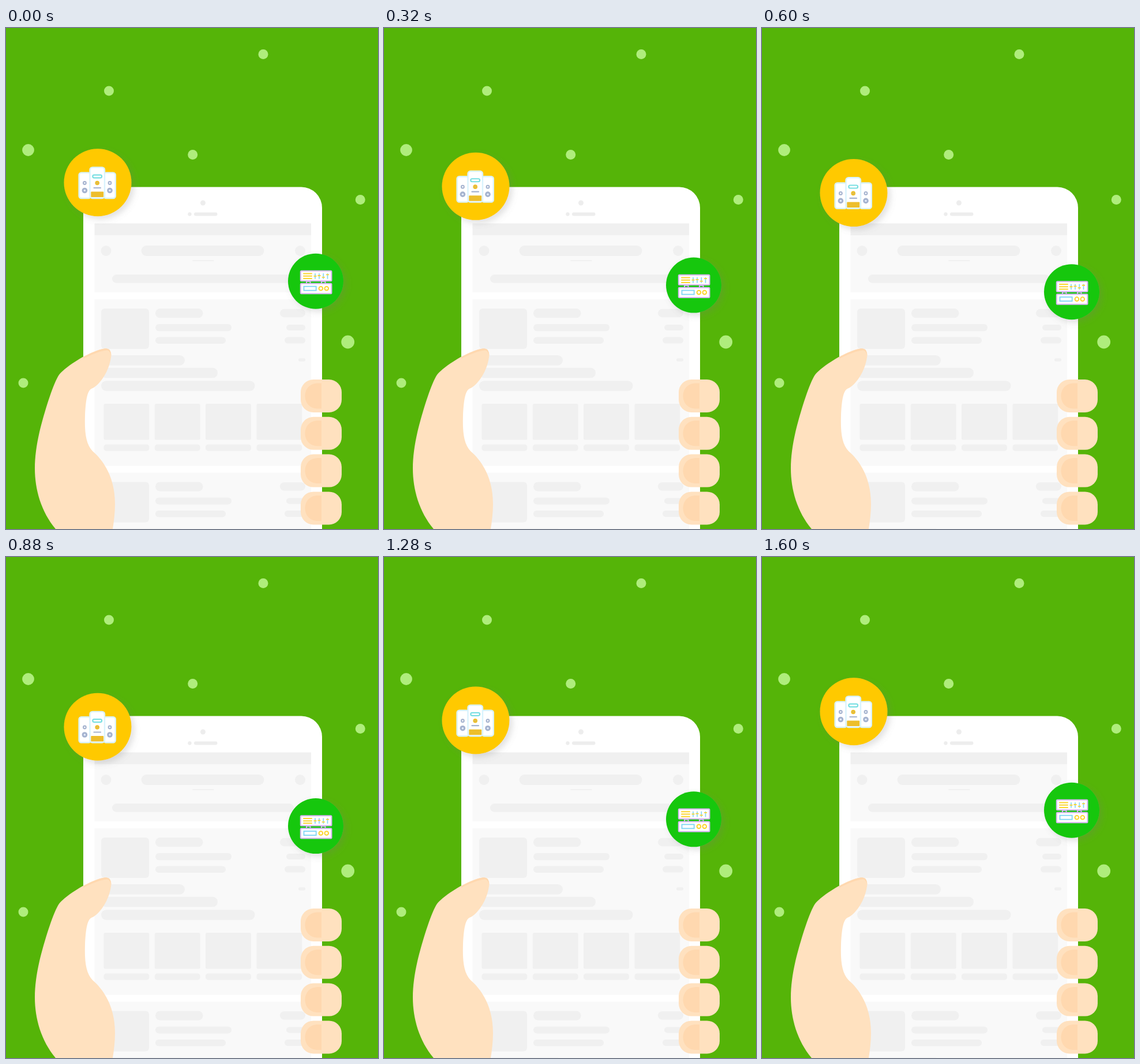
An HTML page that plays this animation: 645x868 px, repeating every 2200 ms.

```html
<!DOCTYPE html>
<html lang="en">
<head>
<meta charset="utf-8">
<title>Tablet in hand</title>
<style>
html, body { margin: 0; width: 100%; height: 100%; overflow: hidden; background: #55b408; }
svg { display: block; width: 645px; height: 868px; }
.grey { fill: #f0f0f0; }
.skin { fill: #ffe1bf; }
.shade { fill: #ffd8af; }
.panel { fill: #f9f9f9; }
.speaker rect.box { fill: #fff; stroke: #d9f3fd; stroke-width: 2.4; }
.speaker .cone { fill: #a5b3cf; }
.line { fill: none; stroke-linecap: round; }
</style>
</head>
<body>
<svg viewBox="0 0 645 868">
  <defs>
    <filter id="shadow" x="-30%" y="-30%" width="170%" height="170%">
      <feDropShadow dx="5" dy="5" stdDeviation="5.5" flood-color="#777" flood-opacity=".22"/>
    </filter>
  </defs>
  <rect width="645" height="868" fill="#55b408"/>
  <g id="dots" fill="#afed7c"></g>

  <rect x="134" y="275.5" width="414" height="640" rx="36" fill="#fff"/>
  <g fill="#ededed">
    <circle cx="341.5" cy="303" r="4.5"/>
    <circle cx="318.5" cy="322.5" r="3.2"/>
    <rect x="326" y="319.5" width="40.5" height="6" rx="3"/>
  </g>
  <g id="screen"></g>

  <path class="skin" d="M86 868C61 838 50 800 50 763C50 743 53 722 58 700
    C67 664 80 622 90 604C92 600 95 597 98 594.500C119 576 146 562 161 558
    C169 555 175 554.500 179 557C182 560 183 566 182 571C179 590 170 605 163 613
    C158 619 153 623 148 625C140 629 138 650 137 672C136 702 139 721 150 733
    C172 752 189 782 189 825C189 840 187 855 185 868Z"/>
  <path class="shade" d="M134 570.500C145 564 160 557 170 555.500C178 554.500 182 557 182.500 568
    C180 559 177 557.500 171 559C160 561 148 566 134 573Z"/>
  <g id="fingers"></g>

  <g id="orange">
    <circle cx="159" cy="267.700" r="58.500" fill="#ffc900" filter="url(#shadow)"/>
    <g class="speaker">
      <g id="sides"></g>
      <rect class="box" x="145.500" y="241.400" width="25.500" height="53.600" rx="4.500"/>
      <rect x="150.300" y="254.600" width="15.800" height="5" rx="2.500" fill="#fff" stroke="#7adfe2" stroke-width="2.200"/>
      <circle cx="158.200" cy="268.500" r="3.800" fill="#f0c024"/>
      <path class="line" d="M156.700 269.800a1.700 1.700 0 1 1 3 0" stroke="#c9b88c" stroke-width="1"/>
      <path class="line" d="M152.500 277H164" stroke="#a5b3cf" stroke-width="2.200"/>
      <rect x="147.300" y="283.500" width="21.900" height="9.600" rx="1" fill="#edbe2c"/>
    </g>
  </g>

  <g id="green">
    <circle cx="537" cy="438.700" r="48" fill="#14c70e" filter="url(#shadow)"/>
    <g stroke="#d6b4f2" stroke-width="2">
      <path class="line" d="M521 441.500V439H527.500V441.500M547 441.500V439H553.500V441.500"/>
      <rect x="510.800" y="420.800" width="53.700" height="17.400" rx="1.500" fill="#fff"/>
      <rect x="510.800" y="442.800" width="53.700" height="17.400" rx="1.500" fill="#fff"/>
    </g>
    <path class="line" d="M516 425.600H530M516 429.800H530M516 434H530" stroke="#fcd52e" stroke-width="2"/>
    <g id="sliders"></g>
    <rect x="516.500" y="447.700" width="21.200" height="7" fill="none" stroke="#83d6f5" stroke-width="1.900"/>
    <g fill="none" stroke="#fcd52e" stroke-width="2">
      <circle cx="545.900" cy="451.200" r="3.300"/>
      <circle cx="555.800" cy="451.200" r="3.300"/>
    </g>
  </g>
</svg>
<script>
const $ = id => document.getElementById(id);

function add(parent, tag, attrs) {
  const el = document.createElementNS("http://www.w3.org/2000/svg", tag);
  for (const key in attrs) el.setAttribute(key, attrs[key]);
  return parent.appendChild(el);
}
const circle = (parent, cx, cy, r, cls = "") => add(parent, "circle", { cx, cy, r, class: cls });
const box = (parent, x1, y1, x2, y2, rx = 0, cls = "grey") =>
  add(parent, "rect", { x: x1, y: y1, width: x2 - x1, height: y2 - y1, rx, class: cls });
const pill = (parent, x1, y1, x2, y2) => box(parent, x1, y1, x2, y2, (y2 - y1) / 2);

[[446, 45.5, 8.5], [178.5, 109, 8.5], [38.5, 211.5, 10.4], [323.7, 219.5, 8.5],
 [614.3, 297.5, 8.5], [592.7, 544, 11.4], [30, 615, 8.5]]
  .forEach(dot => circle($("dots"), ...dot));

const screen = $("screen");
box(screen, 153.5, 338.5, 529, 359);
box(screen, 153.5, 359, 529, 458, 0, "panel");
circle(screen, 173.5, 386, 9, "grey");
circle(screen, 510, 386, 9, "grey");
pill(screen, 234.5, 377, 447.5, 395);
box(screen, 323, 402.2, 360.5, 404, 1);
pill(screen, 184, 427.3, 499, 441.7);

function card(y) {
  const g = add(screen, "g", { transform: `translate(0 ${y})` });
  box(g, 153.5, 0, 529, 288.5, 0, "panel");
  box(g, 165, 16, 248, 86, 6);
  pill(g, 259, 16, 341.5, 32.3);
  pill(g, 259, 43, 391, 55.2);
  pill(g, 259, 65.5, 381, 77);
  pill(g, 475, 16.8, 519, 31.2);
  pill(g, 486, 44, 519, 54);
  pill(g, 483, 65.5, 519, 76.6);
  pill(g, 165, 97, 310, 114.5);
  pill(g, 165, 118.7, 367, 136.2);
  pill(g, 165, 141.2, 431.5, 158.8);
  pill(g, 507, 102.3, 519, 107.7);
  for (let i = 0; i < 4; i++) {
    const x = 169.5 + i * 88.3;
    box(g, x, 181, x + 78.8, 243.5, 2.5);
    box(g, x, 251.5, x + 78.8, 262.8, 4.5);
  }
}
card(470);
card(770.4);

for (let i = 0; i < 4; i++) {
  const g = add($("fingers"), "g", { transform: `translate(0 ${609 + i * 64.8})` });
  box(g, 511, 0, 582, 57, 22, "skin");
  add(g, "path", { class: "shade", d: "M547 6.500H541C526 6.500 518.500 17 518.500 28.500S526 50.500 541 50.500H547Z" });
}

for (const [x, cx] of [[126.6, 136.4], [169.6, 180]]) {
  const g = $("sides");
  box(g, x, 250.6, x + 20.2, 295, 4, "box");
  circle(g, cx, 268.5, 3.4, "cone");
  circle(g, cx, 268.5, 1.3).setAttribute("fill", "#fff");
  circle(g, cx, 281.5, 4.8, "cone");
  circle(g, cx, 281.5, 1.7).setAttribute("fill", "#e6eefa");
}

[[536, 429.8], [543, 429], [550.3, 431.8], [557.5, 427.3]].forEach(([x, y]) => {
  add($("sliders"), "path", { class: "line", d: `M${x} 425.800V434`, stroke: "#83d6f5", "stroke-width": 1.7 });
  add($("sliders"), "path", { class: "line", d: `M${x - 1.8} ${y}H${x + 1.8}`, stroke: "#fcd52e", "stroke-width": 1.8 });
});

// Sink for 1000 ms, rise for 600 ms, rest until the loop ends.
const LOOP = 2200, DOWN = 1000, UP = 600, STEP = 40;
const ease = p => p * p * (3 - 2 * p);

function depth(t) {
  if (t < DOWN) return ease(t / DOWN);
  return 1 - ease(Math.min(1, (t - DOWN) / UP));
}

function draw(now) {
  const t = Math.floor((now % LOOP) / STEP) * STEP;
  const d = depth(t);
  $("orange").setAttribute("transform", `translate(0 ${27.6 * d})`);
  $("green").setAttribute("transform", `translate(0 ${28.5 * d})`);
}

let start = null;
function tick() {
  const now = performance.now();
  if (start === null) start = now;
  draw(now - start);
  requestAnimationFrame(tick);
}
draw(0);
requestAnimationFrame(tick);
</script>
</body>
</html>
```
